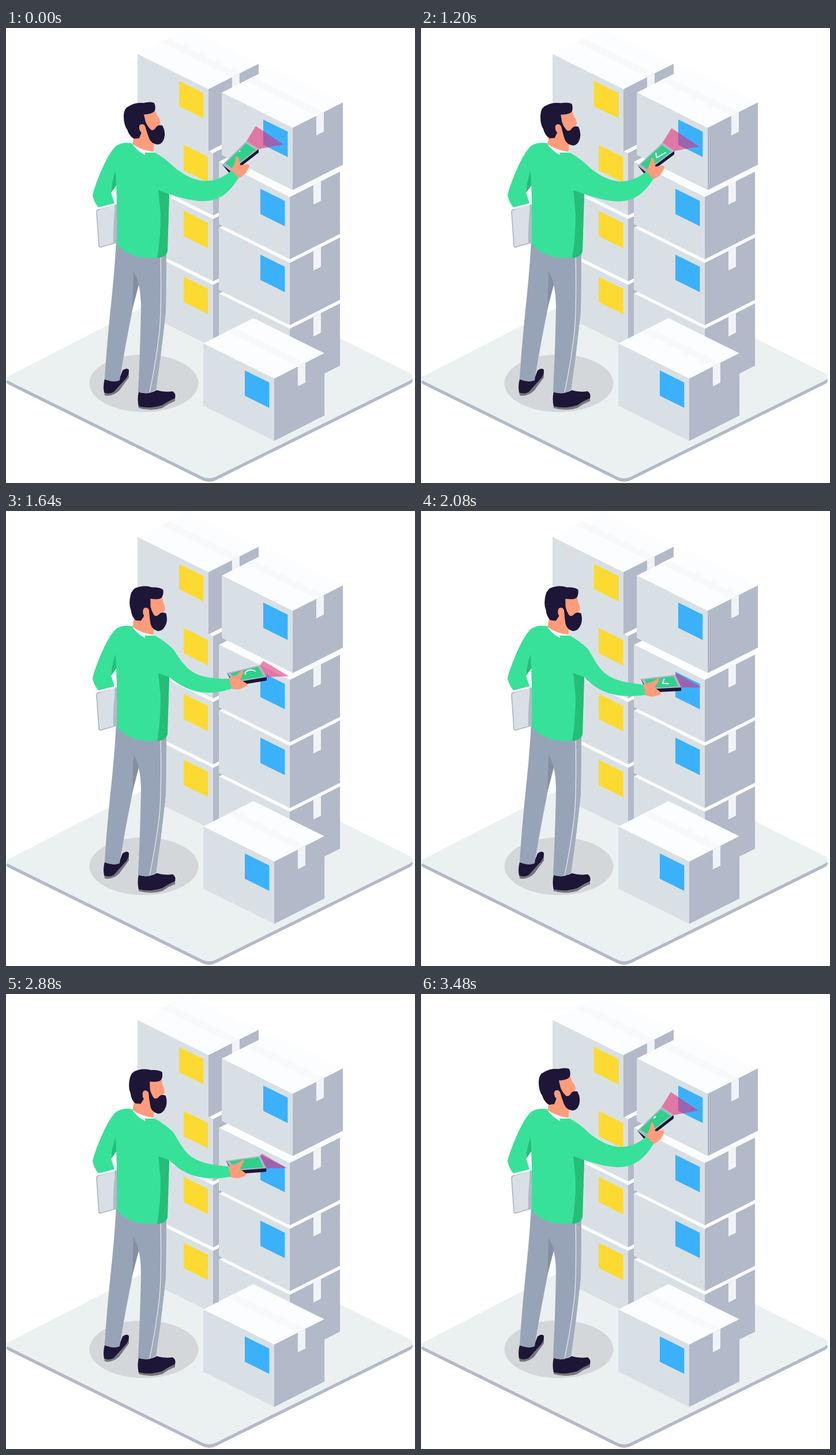
An HTML page for the animation above (3.52 s loop, 709 by 789 pixels).

```html
<!DOCTYPE html>
<html lang="en">
<head>
<meta charset="utf-8">
<title>Warehouse scan</title>
<style>
  html, body { margin: 0; width: 100%; height: 100%; overflow: hidden; background: #fff; }
  svg { display: block; width: 100vw; height: 100vh; }
  .skin { fill: #ff9c7b; }
  .ink { fill: #1d1637; }
  .knit { fill: #37e199; }
  .shade { fill: #25bd78; }
  .cloth { fill: #97a4b8; }
  .sole { fill: #77757c; }
  .mark { fill: none; stroke: #f4fffa; stroke-width: 2; stroke-linecap: round; stroke-linejoin: round; }
</style>
</head>
<body>
<svg viewBox="0 0 709 789">
  <defs>
    <path id="slab" d="M4 604L352 425L701 599Q709 605 701 611L364 778Q352 784 340 778L4 612Q-3 608 4 604Z"/>
  </defs>
  <use href="#slab" y="6" fill="#b2b9c8"/>
  <use href="#slab" fill="#ebf1f1"/>
  <g id="boxes"></g>
  <ellipse cx="239" cy="616" rx="94.5" ry="50" fill="#d4d7da"/>

  <!-- shoes -->
  <path class="sole" d="M169 622L171 637Q184 640 196 629L213 606V598Z"/>
  <path class="ink" d="M171 609Q184 615 197 607L202 594Q210 588 213 593Q214 602 205 611Q195 622 187 631Q179 636 170 632Q168 620 171 609Z"/>
  <path class="sole" d="M229 648L230 659Q250 665 271 659Q284 650 293 647V640Z"/>
  <path class="ink" d="M230 631Q246 637 261 628Q274 632 289 630Q295 634 293 642Q283 646 271 654Q250 661 230 656Q227 643 230 631Z"/>

  <!-- trousers -->
  <path class="cloth" d="M191 368Q189 410 183 470Q175 545 171 608Q184 616 197 611Q205 560 219 490L228 430L235 385Z"/>
  <path fill="#858fa4" d="M221 422L219 488L231 442Z"/>
  <path class="cloth" d="M200 380Q215 400 221 422Q233 440 234 482Q233 550 229 631Q245 637 260 627Q270 560 277 490L278 385Z"/>
  <path fill="#a2abb9" d="M268 390Q270 500 265 535Q258 590 249 631L260 627Q270 560 277 490L278 385Z"/>
  <path fill="none" stroke="#e3e8ee" stroke-width="1.3" d="M268 390Q270 500 265 535Q258 590 249 631"/>

  <!-- tablet and torso -->
  <path fill="#d8e0e5" stroke="#a8b0bf" stroke-width="1.5" d="M160 315L189 306L192 372L164 380Q161 380 161 377L157 319Q157 316 160 315Z"/>
  <path fill="#b2b9c8" d="M190 306Q185 340 186 374L193 372V306Z"/>
  <path fill="#fff" d="M159 308L187 302L189 307L163 314Z"/>
  <path class="skin" d="M222 186L219 203L255 222L257 194Z"/>
  <path class="shade" d="M190 244L192 272L182 286Q183 262 190 244Z"/>
  <path class="knit" d="M219 200Q199 196 188 207Q176 221 164 250Q153 276 150 290Q152 301 160 311L188 304L182 285Q184 264 190 248Q193 300 192 374Q203 390 230 397Q256 402 277 393Q280 388 280 378L283 285L290 240Q276 226 258 216L254 223Q234 221 219 200Z"/>
  <path class="shade" d="M264 281Q266 300 268 322Q268 365 262 399Q278 397 280 387L283 288Z"/>
  <path fill="#fff" d="M219 201Q234 212 258 215L254 223Q234 222 219 201Z"/>

  <g id="head">
    <path class="skin" d="M230 148L259 143Q260 150 266 157L268 164L265 169L268 178L256 192L225 197L222 180Z"/>
    <path class="ink" d="M222 192Q214 188 210 176Q204 168 204 152Q204 139 214 135Q224 129 238 130Q250 127 257 130Q260 137 258 143Q255 149 239 150L242 163Q246 172 252 177Q257 178 260 172Q264 167 271 169Q276 178 275 187Q273 201 263 202Q252 201 248 191L240 169Q234 164 231 170Q230 177 235 181L231 191Z"/>
    <path class="skin" d="M232 169Q239 163 242 173L246 189L234 193Q238 183 232 178Z"/>
  </g>

  <path id="beam" fill="#e62a76" fill-opacity=".57"/>
  <path id="edge" class="ink"/>
  <path id="phone" fill="#aeb6c5"/>
  <path id="screen" fill="#2fd08b"/>
  <path id="tick" class="mark"/>
  <path id="ring" class="mark"/>
  <path id="hand" class="skin" d="M-4 -9L8 -12Q16 -14 22 -19Q27 -21 25 -15L18 -4L27 3Q31 7 26 9L15 12Q7 12 0 9Z"/>
  <path id="arm" class="knit"/>
</svg>
<script>
const LOOP = 3520, STEP = 40;
const set = (id, name, value) => document.getElementById(id).setAttribute(name, value);
const line = pts => 'M' + pts.map(p => p.join()).join('L');
const poly = pts => line(pts) + 'Z';
const clamp = x => Math.min(1, Math.max(0, x));
const smooth = (a, b, t) => { const x = clamp((t - a) / (b - a)); return x * x * (3 - 2 * x); };
const mix = (a, b, k) => a.map((v, i) => v + (b[i] - v) * k);

// Carton placed by the top of its front edge: a runs left, b right, h down.
function box(x, y, label) {
  const pt = (a, b, h) => [x - 123 * a + 87 * b, y - 61 * a - 44 * b + h];
  const face = (fill, ...pts) => `<path fill="${fill}" d="${poly(pts)}"/>`;
  const left = (fill, a, a2, h, h2) =>
    face(fill, pt(a, 0, h), pt(a2, 0, h), pt(a2, 0, h2), pt(a, 0, h2));
  const right = (fill, b, b2, h) =>
    face(fill, pt(0, b, 0), pt(0, b2, 0), pt(0, b2, h), pt(0, b, h));
  const top = (fill, b, b2) =>
    face(fill, pt(0, b, 0), pt(1, b, 0), pt(1, b2, 0), pt(0, b2, 0));
  return top('#fcfdfe', 0, 1) + top('#f7f9fb', .47, .62) +
    left('#d9e0e5', 0, 1, 0, 108) + right('#b2b9c8', 0, 1, 108) +
    right('#f1f4f7', .47, .62, 34) +
    (label ? left(label, .07, .415, 11, 55) : '');
}
const yellow = '#fcda32', blue = '#3bb1fb';
const stack = (x, y, colour) =>
  [2, 1, 0].map(i => box(x, y + 114.3 * i, colour(i))).join('');
document.getElementById('boxes').innerHTML =
  stack(359, 217, () => yellow) + box(351, 106, yellow) +
  stack(492, 293, i => i < 2 && blue) + box(497, 173, blue) +
  box(465, 608, blue);

// The arm blends between two poses; the phone swings out a little on the way.
const raised = {
  turn: [-47], wrist: [397, 254],
  phone: [[375, 237], [417, 196], [438, 210], [389, 248]],
  beam: [[433, 170], [481, 202]],
  arm: [[316, 262], [352, 280], [391, 247], [403, 260], [374, 308], [342, 307]]
};
const lowered = {
  turn: [0], wrist: [387, 310],
  phone: [[381, 291], [441, 284], [451, 306], [392, 309]],
  beam: [[443, 281], [486, 306]],
  arm: [[312, 276], [314, 294], [385, 301], [389, 319], [345, 325], [310, 318]]
};

function drawArm(k) {
  const blend = key => raised[key].map((p, i) => mix(p, lowered[key][i], k));
  const out = amount => ([x, y]) => [x + amount * Math.sin(Math.PI * k), y];
  const low = ([x, y]) => [x, y + 6];
  const [p0, p1, p2, p3] = blend('phone').map(out(6));
  const [far, tip] = blend('beam').map(out(9));
  const arm = blend('arm');
  set('beam', 'd', poly([p1, far, tip, p2]));
  set('edge', 'd', poly([p0, low(p3), low(p2), p2]));
  set('phone', 'd', poly([p0, p1, p2, p3]));
  set('hand', 'transform',
    `translate(${mix(raised.wrist, lowered.wrist, k)}) rotate(${mix(raised.turn, lowered.turn, k)})`);
  set('arm', 'd', `M240 216L257 216Q276 226 290 240C${arm.slice(0, 3).join(' ')}` +
    `L${arm[3]}C${arm[4]} ${arm[5]} 283 288L264 281Z`);
  return (u, v) => mix(mix(p0, p1, u), mix(p3, p2, u), v);
}

// The tick is written after each scan, the ring turns during each swing.
function drawScreen(t, at) {
  set('screen', 'd', poly([at(.09, .1), at(.93, .1), at(.93, .9), at(.09, .9)]));

  const scan = t < 1240 ? t : t - 1800;
  const grow = t < 2880 ? clamp((scan - 80) / 280) : 0;
  const [a, b, c] = [at(.63, .25), at(.53, .57), at(.81, .7)];
  set('tick', 'd', grow
    ? line([a, mix(a, b, clamp(grow * 3)), mix(b, c, clamp(grow * 1.5 - .5))]) : '');

  const since = t < 80 ? t + LOOP - 2880 : t >= 2880 ? t - 2880 : t - 1200;
  const x = clamp(since / 680);
  const mid = 1.5 * Math.PI * smooth(.1, .72, x);
  const half = Math.PI / 2 * Math.sin(Math.PI * x) ** 2;
  const dot = i => {
    const r = mid + half * (i / 8 - 1);
    return at(.63 + .17 * Math.cos(r), .5 + .3 * Math.sin(r));
  };
  set('ring', 'd', x > 0 && x < 1 ? line(Array.from({ length: 17 }, (_, i) => dot(i))) : '');
}

function draw(t) {
  const swing = smooth(1120, 1840, t) - smooth(2800, 3480, t);
  const nod = smooth(1040, 1500, t) - smooth(2760, 3340, t);
  set('head', 'transform', `rotate(${12.5 * nod} 235 203)`);
  drawScreen(t, drawArm(swing));
}

const start = performance.now();
function tick() {
  const t = (performance.now() - start) % LOOP;
  draw(Math.floor(t / STEP) * STEP);
  requestAnimationFrame(tick);
}
tick();
</script>
</body>
</html>
```
